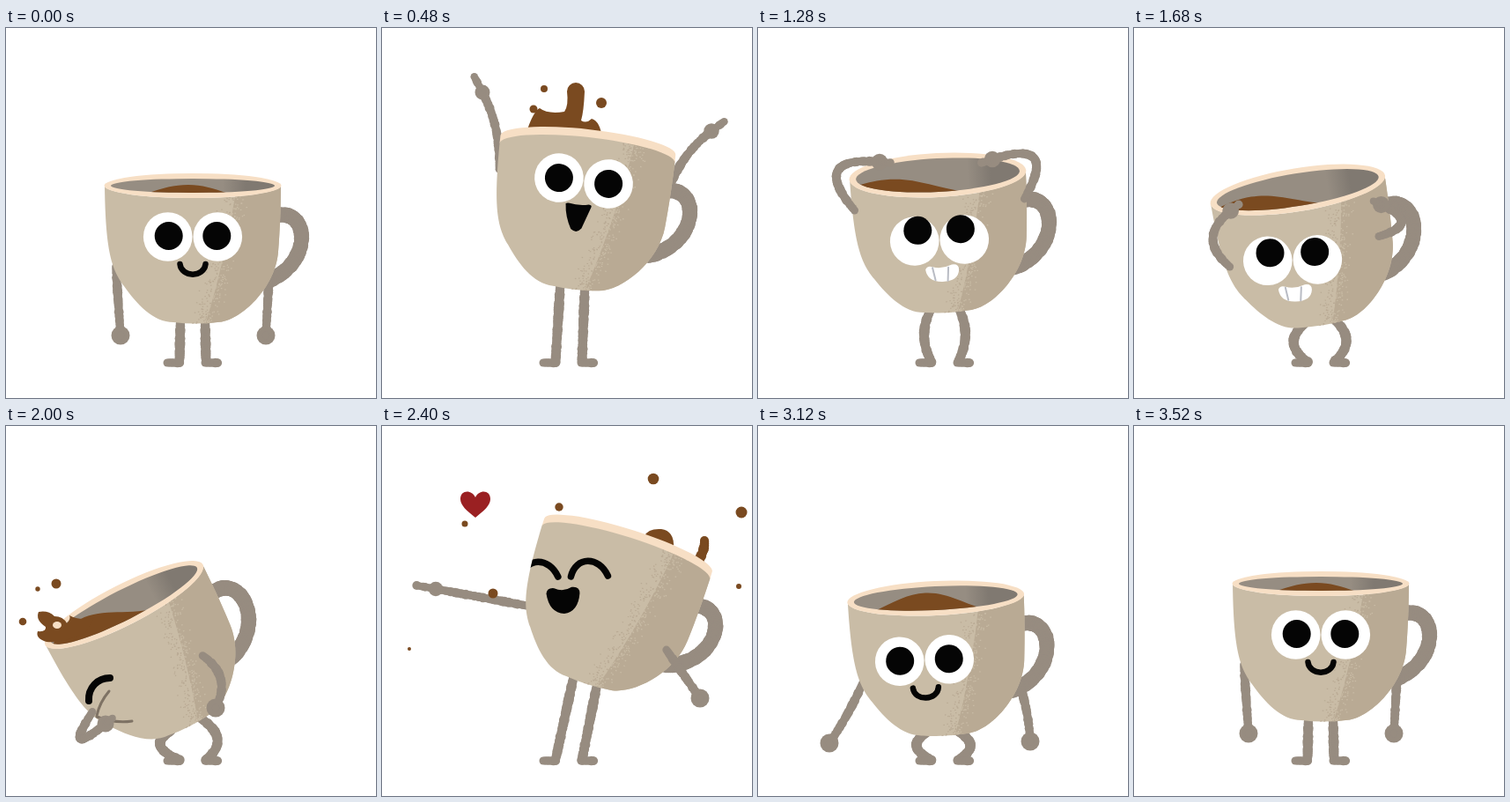
Animation, 420 px wide and 420 px high, one loop 3.6 s. Source, as an HTML page with a canvas:

```html
<!DOCTYPE html>
<html lang="en">
<head>
<meta charset="utf-8">
<title>Cheerful coffee cup</title>
<style>
html, body { margin: 0; width: 100%; height: 100%; overflow: hidden; background: #fff; }
canvas { display: block; width: 420px; height: 420px; }
</style>
</head>
<body>
<canvas id="stage" width="420" height="420"></canvas>
<script>
const g = document.getElementById('stage').getContext('2d');
const LOOP = 3600, STEP = 80, DEPTH = 156, BURST = 160, GRAVITY = 0.0008;
const CLAY = '#c9bca6', SHADE = '#b9aa94', CREAM = '#f7dfc5', LIMB = '#978c80',
  COFFEE = '#7a4a20', INSIDE = '#968d82', DEEP = '#807971', INK = '#050505';

const clamp = (v, lo, hi) => Math.min(hi, Math.max(lo, v));
const ease = u => u * u * (3 - 2 * u);
const arch = u => Math.sin(Math.PI * u);
const curve = (p, u) => p.length < 2 ? p[0] : curve(p.slice(1).map((q, i) => mix(p[i], q, u)), u);
function mix(a, b, u) {
  if (Array.isArray(a)) return a.map((v, i) => mix(v, b[i], u));
  if (typeof a === 'object') return Object.fromEntries(Object.keys(a).map(k => [k, mix(a[k], b[k], u)]));
  return a + (b - a) * u;
}
const random = seed => () => {
  seed = (seed * 16807) % 2147483647;
  return seed / 2147483647;
};

// cup: x, y, tilt, opening (negative = seen from below); face: x, y, tilt
// look: pupils inward, down; coffee: crest in cup space
// hands: x, y, arm bow, finger length; bend: knees; inset: right shoulder
const base = { look: [0, 0], coffee: [0, 0], bend: 0, inset: 0 };
const rest = {
  ...base, cup: [212, 179, 0, 14], face: [212, 237, 0], look: [1, -1], coffee: [-5, -1],
  left: [130, 349, 0, 0], right: [295, 349, 0, 0]
};
const cheer = {
  ...base, cup: [233, 141, 6.3, -18], face: [229, 173.5, 7],
  left: [114, 73, -8, 20], right: [374, 117, -8, 18]
};
const worry = {
  ...base, cup: [204, 167, -3, 25], face: [206, 241, -2], look: [4, -12], coffee: [-54, 2],
  left: [138, 152, 50, 12], right: [266, 149, 50, 13], bend: 16
};
const giggle = {
  ...base, cup: [134, 203, -27, 23], face: [106, 300, 0], coffee: [-52, -8],
  left: [113, 338, -42, 10], right: [238, 320, -18, 0], bend: 34, inset: 34
};
const kiss = {
  ...base, cup: [277, 143, 17.6, -18], face: [207, 163, -1],
  left: [61, 185, 0, 22], right: [361, 309, 0, 0], inset: 10
};
const settle = {
  ...base, cup: [191.5, 192, -5.5, 25], face: [166, 275, -5], coffee: [-18, -12],
  left: [92, 351, 5, 0], right: [263, 347, -8, 0], bend: 38
};

// Each pose is held between from and to; splash and drops are fullest at peak.
const beats = [
  { form: rest, mood: 'rest', from: 0, to: 160, bob: 0 },
  { form: cheer, mood: 'cheer', from: 480, to: 560, bob: 3, peak: 480, splash: crown,
    drops: [[184, 69, 4], [172, 92, 4.5], [249, 85, 6]] },
  { form: worry, mood: 'worry', from: 960, to: 1600, bob: 3, leftFront: true, rightFront: true },
  { form: giggle, mood: 'giggle', from: 1840, to: 2160, bob: 3, peak: 2000, splash: spill, splashFront: true,
    leftFront: true, rightFront: true, drops: [[57, 179, 5.5], [36, 185, 2.7], [19, 222, 4.3]] },
  { form: kiss, mood: 'kiss', from: 2400, to: 2560, bob: 3, peak: 2400, splash: sideSplash, rightFront: true,
    drops: [[308, 60, 6.3], [408, 98, 6.5], [405, 182, 3], [201, 92, 4.7], [94, 111, 3.5], [126, 190, 5.5], [31, 253, 2]] },
  { form: settle, mood: 'settle', from: 2800, to: 2960, bob: 3, peak: 2880,
    drops: [[201, 148, 7], [289, 164, 4], [268, 186, 3], [277, 134, 2]] },
  { form: rest, mood: 'rest', from: 3280, to: LOOP, bob: 0 }
];

// Lowers the upper body onto bent knees and swings the hands outward.
function sway(form, dy, swing) {
  const lower = ([x, y, ...more], dx = 0) => [x + dx, y + dy, ...more];
  return {
    ...form, cup: lower(form.cup), face: lower(form.face), bend: Math.max(0, form.bend + dy),
    left: lower(form.left, -swing), right: lower(form.right, swing)
  };
}
function stateAt(t) {
  const i = beats.findLastIndex(b => b.from <= t), beat = beats[i];
  if (t <= beat.to) {
    const dy = beat.bob * Math.sin(2 * Math.PI * (t - beat.from) / (beat.to - beat.from));
    return { beat, form: sway(beat.form, dy, 0) };
  }
  const next = beats[i + 1], u = ease((t - beat.to) / (next.from - beat.to));
  return { beat: u < 0.5 ? beat : next, form: sway(mix(beat.form, next.form, u), 10 * arch(u), 30 * arch(u)) };
}

function oval(x, y, rx, ry, color) {
  g.fillStyle = color;
  g.beginPath();
  g.ellipse(x, y, rx, ry, 0, 0, 7);
  g.fill();
}
const disc = (x, y, r, color) => oval(x, y, r, r, color);
function shape(d, color) {
  g.fillStyle = color;
  g.fill(new Path2D(d));
}
function line(d, width, color = INK) {
  g.strokeStyle = color;
  g.lineWidth = width;
  g.lineCap = g.lineJoin = 'round';
  g.stroke(new Path2D(d));
}
function within(x, y, degrees, draw) {
  g.save();
  g.translate(x, y);
  g.rotate(degrees * Math.PI / 180);
  draw();
  g.restore();
}

// A chalky stroke: overlapping dabs of slightly uneven size.
function limb(points, width, color = LIMB) {
  const rnd = random(77);
  const length = points.slice(1).reduce((s, q, i) => s + Math.hypot(q[0] - points[i][0], q[1] - points[i][1]), 0);
  const n = Math.max(2, Math.ceil(length / 2.5));
  for (let i = 0; i <= n; i++) {
    const [x, y] = curve(points, i / n);
    disc(x, y, width / 2 + rnd() - 0.5, color);
  }
}
function onCup([x, y, tilt], px, py) {
  const a = tilt * Math.PI / 180, c = Math.cos(a), s = Math.sin(a);
  return [x + px * c - py * s, y + px * s + py * c];
}
// The shoulder slides up the cup as the hand rises; the bow pushes the elbow outward.
function arm(cup, [x, y, bow, finger], side, inset) {
  const height = clamp(y - cup[1] + 50, 30, 92);
  const shoulder = onCup(cup, side * (102 - 0.16 * height - inset), height), hand = [x, y];
  const dx = x - shoulder[0], dy = y - shoulder[1], k = side * bow / Math.hypot(dx, dy);
  const elbow = u => [shoulder[0] + dx * u - dy * k, shoulder[1] + dy * u + dx * k];
  const wrist = elbow(2 / 3), turn = Math.atan2(y - wrist[1], x - wrist[0]);
  limb([shoulder, elbow(1 / 3), wrist, hand], 10);
  disc(x, y, 10.5 - finger / 10, LIMB);
  limb([hand, [x + finger * Math.cos(turn), y + finger * Math.sin(turn)]], 9);
}
function leg(cup, side, bend) {
  const hip = onCup(cup, side * (14 + bend / 9), 152), ankle = [212 + side * 15, 379];
  const knee = mix(hip, ankle, 0.5);
  knee[0] += side * bend;
  limb([hip, knee, ankle], 11);
  const heel = side < 0 ? 183 : 226;
  limb([[heel, 380], [heel + 14, 380]], 10);
}

function bodyPath(ry) {
  g.beginPath();
  g.moveTo(-100, 0);
  g.bezierCurveTo(-99, 75, -92, 95, -78, 114);
  g.bezierCurveTo(-64, 134, -45, DEPTH - 1, -22, DEPTH - 1);
  g.quadraticCurveTo(3, DEPTH + 2, 28, DEPTH - 1);
  g.bezierCurveTo(55, DEPTH - 2, 94, 115, 97, 75);
  g.bezierCurveTo(99, 50, 100, 20, 100, 0);
  g.ellipse(0, 0, 100, Math.abs(ry), 0, 0, Math.PI, ry < 0);
  g.closePath();
}
function grain() {
  const rnd = random(41);
  for (let i = 0; i < 420; i++) {
    const y = -20 + 178 * rnd(), off = (rnd() + rnd() - 1) * 18;
    g.fillStyle = off < 0 ? SHADE : CLAY;
    g.fillRect(50 - 0.23 * y + off, y, 1.5, 1.2);
  }
}
function brew([x, y]) {
  shape(`M${x - 90} 60V22C${x - 50} 12 ${x - 30} ${y} ${x} ${y}C${x + 30} ${y} ${x + 50} 14 ${x + 90} 22V60Z`, COFFEE);
}
function cupBody(ry, coffee) {
  g.save();
  bodyPath(ry);
  g.fillStyle = CLAY;
  g.fill();
  g.clip();
  shape('M54 -30Q42 70 12 165H130V-30Z', SHADE);
  grain();
  g.restore();
  if (ry < 0) {
    g.fillStyle = CREAM;
    g.beginPath();
    g.ellipse(0, -8, 100, -ry, 0, Math.PI, 2 * Math.PI);
    g.ellipse(0, 1, 100, -ry, 0, 0, Math.PI, true);
    g.fill();
    return;
  }
  oval(0, 0, 100.5, ry, CREAM);
  g.save();
  g.beginPath();
  g.ellipse(0, 0, 93, Math.max(ry - 6, 0.5), 0, 0, 7);
  g.clip();
  const dusk = g.createLinearGradient(34, 0, 60, 0);
  dusk.addColorStop(0, INSIDE);
  dusk.addColorStop(1, DEEP);
  g.fillStyle = dusk;
  g.fillRect(-100, -40, 200, 80);
  brew(coffee);
  g.restore();
}

function eyes(mood, [inward, down]) {
  const lift = mood === 'kiss' ? 15 : 6;
  for (const side of [-1, 1]) {
    const x = side * 28.3;
    if (mood === 'kiss' || mood === 'settle') {
      line(`M${x - 21} 8C${x - 15} ${-lift} ${x + 11} ${-lift} ${x + 21} 8`, 7.5);
    } else {
      disc(x, 0, 27.8, '#fff');
      disc(x - side * inward, down, 16, INK);
    }
  }
}
function smile() {
  line('M-14.5 31C-13 46.5 13 46.5 14.5 31', 6.5);
}
const mouths = {
  rest: smile,
  settle: smile,
  cheer: () => shape('M-17 29Q-18 27 -14 27Q-2 29 9 26Q13 26 12 29L4 54Q-1 61 -8 56Q-16 42 -17 29Z', INK),
  kiss: () => shape('M-21 27Q-20 20 -12 21Q-2 26 8 20Q17 19 17 27Q15 48 -1 50Q-18 49 -21 27Z', INK),
  worry() {
    shape('M-17 33Q-15 28 -9 30Q2 33 13 28Q21 27 21 34Q20 47 2 47Q-15 47 -17 33Z', '#fff');
    line('M-9 31L-6 45M9 31L8 46', 2, '#b9bcc4');
  }
};
function face(mood, look) {
  if (mood === 'giggle') {
    line('M-12 12C-13 -3 -2 -14 12 -14', 8);
    line('M11 1Q0 14 -3 29M-3 30Q18 38 37 35', 3, '#7e7264');
    return;
  }
  eyes(mood, look);
  mouths[mood]();
}

function crown(k) {
  within(0, 120, 0, () => {
    g.scale(1, k);
    shape('M164 -2Q172 -26 179 -29Q188 -22 207 -25Q212 -32 210 -48A10 10 0 0 1 230 -48Q229 -25 226 -15Q232 -11 238 -17Q248 -14 250 6L200 14Z', COFFEE);
  });
}
function sideSplash(k) {
  within(325, 155, 0, () => {
    g.scale(1, k);
    shape('M-27 -30Q-23 -39 -8 -38Q7 -36 6 -17L4 5Z', COFFEE);
    limb([[41, -25], [42, -12], [29, 6]], 11, COFFEE);
  });
}
function spill(k) {
  within(60, 245, 0, () => {
    g.scale(k, k);
    shape('M-14 0Q-27 -4 -24 -12Q-14 -11 -15 -17Q-27 -25 -23 -34Q-12 -36 -5 -29Q5 -29 9 -21Q14 -26 12 -30Q22 -24 40 -27L30 -10Q4 2 -14 0Z', COFFEE);
    oval(-2, -19, 5, 4, CREAM);
  });
}
function heart(age) {
  const u = age / 320, k = clamp(1 + age / 200, 0.5, 1);
  within(106 - 16 * u, 89 - 45 * u, 0, () => {
    g.scale(k, k);
    shape('M0 15C-10 7 -17 1 -17 -6C-17 -17 -4 -17 0 -8C4 -17 17 -17 17 -6C17 1 10 7 0 15Z', '#9a2022');
  });
}
// Drops leave the middle of the rim and pass their listed places at the peak.
function spray({ form, drops }, age) {
  const u = 1 + age / BURST, [ox, oy] = form.cup;
  const sag = GRAVITY / 2 * BURST * BURST * u * (u - 1);
  for (const [x, y, r] of drops) disc(mix(ox, x, u), mix(oy, y, u) + sag, r, COFFEE);
}

function render(t) {
  const { beat, form } = stateAt(t), { cup, left, right, inset, bend } = form;
  const age = t - beat.peak, active = Math.abs(age) < BURST;
  const splash = () => active && beat.splash && beat.splash(1 - (age / BURST) ** 2);
  const leftArm = () => arm(cup, left, -1, 0);
  const rightArm = () => arm(cup, right, 1, inset);
  const inCup = draw => within(cup[0], cup[1], cup[2], draw);

  g.fillStyle = '#fff';
  g.fillRect(0, 0, 420, 420);
  leg(cup, -1, bend);
  leg(cup, 1, bend);
  inCup(() => limb([[90, 35], [133, 20], [139, 90], [82, 109]], 17));
  if (!beat.leftFront) leftArm();
  if (!beat.rightFront) rightArm();
  if (!beat.splashFront) splash();
  inCup(() => cupBody(cup[3], form.coffee));

  g.save();
  inCup(() => bodyPath(cup[3]));
  g.clip();
  within(...form.face, () => face(beat.mood, form.look));
  g.restore();

  if (beat.splashFront) splash();
  if (beat.leftFront) leftArm();
  if (beat.rightFront) rightArm();
  if (active) spray(beat, age);
  if (beat.mood === 'kiss') heart(age);
}

function tick() {
  render(Math.floor(performance.now() % LOOP / STEP) * STEP);
  requestAnimationFrame(tick);
}
tick();
</script>
</body>
</html>
```
